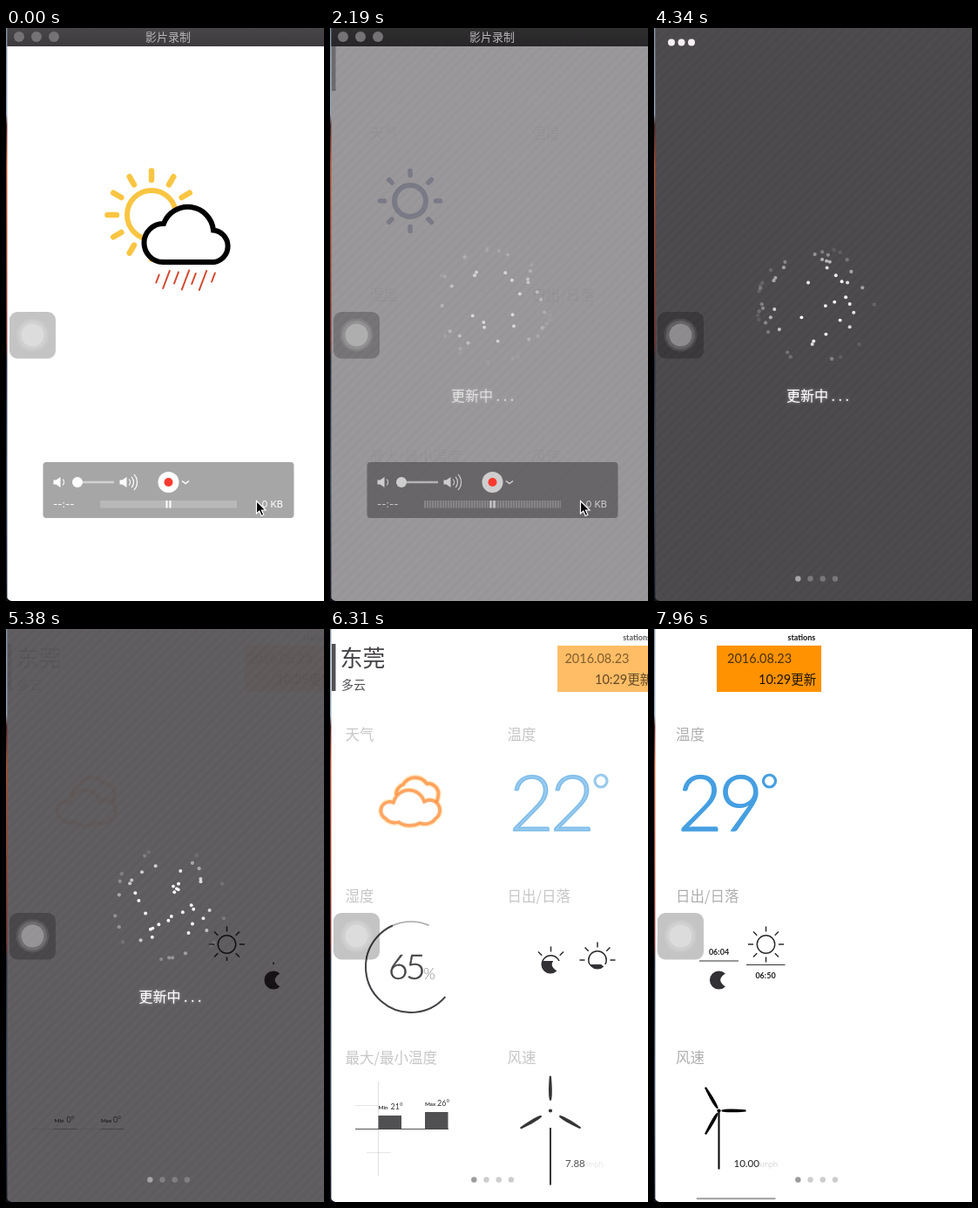
Recreate the animation shown at these times as an HTML page with a canvas. Size 365 by 656 pixels, loop 8000 ms.

```html
<!DOCTYPE html>
<html lang="zh">
<head>
<meta charset="utf-8">
<title>天气</title>
<style>
html, body { margin: 0; width: 100%; height: 100%; overflow: hidden; background: #fff; }
canvas { display: block; width: 365px; height: 656px; }
</style>
</head>
<body>
<canvas id="stage"></canvas>
<script>
const W = 365, H = 656, LOOP = 8000, TAU = Math.PI * 2, RAD = Math.PI / 180;
const CJK = '"Noto Sans CJK SC", "Noto Sans CJK", sans-serif';
const LATO = 'Lato, "Noto Sans CJK SC", "Noto Sans CJK", sans-serif';
const canvas = document.getElementById('stage');
const c = canvas.getContext('2d');
const dpr = window.devicePixelRatio || 1;
canvas.width = W * dpr;
canvas.height = H * dpr;

const clamp = v => Math.max(0, Math.min(1, v));
const ramp = (t, a, b) => clamp((t - a) / (b - a));
const smooth = u => u * u * (3 - 2 * u);
const black = a => `rgba(0,0,0,${a})`;
const white = a => `rgba(255,255,255,${a})`;

function layer(alpha, draw) {
  if (alpha <= 0) return;
  c.save();
  c.globalAlpha *= Math.min(1, alpha);
  draw();
  c.restore();
}
function rect(x, y, w, h, fill) {
  c.fillStyle = fill;
  c.fillRect(x, y, w, h);
}
function panel(x, y, w, h, r, fill) {
  c.beginPath();
  c.roundRect(x, y, w, h, r);
  c.fillStyle = fill;
  c.fill();
}
function disc(x, y, r, fill) {
  c.beginPath();
  c.arc(x, y, r, 0, TAU);
  c.fillStyle = fill;
  c.fill();
}
function arc(x, y, r, a, b, color, width) {
  c.beginPath();
  c.arc(x, y, r, a, b);
  c.strokeStyle = color;
  c.lineWidth = width;
  c.stroke();
}
function line(x1, y1, x2, y2, color, width) {
  c.beginPath();
  c.moveTo(x1, y1);
  c.lineTo(x2, y2);
  c.strokeStyle = color;
  c.lineWidth = width;
  c.stroke();
}
function text(s, x, y, font, color, align = 'left', spacing = 0) {
  c.font = font;
  c.textAlign = align;
  c.textBaseline = 'alphabetic';
  c.letterSpacing = spacing + 'px';
  c.fillStyle = color;
  c.fillText(s, x, y);
}
// Light figures with a slightly thicker stem
function figures(s, x, y, size, color, spacing, extra) {
  text(s, x, y, `300 ${size}px ${LATO}`, color, 'left', spacing);
  c.lineJoin = 'round';
  c.lineWidth = extra;
  c.strokeStyle = color;
  c.strokeText(s, x, y);
}
function rays(x, y, from, to, count, color, width) {
  for (let i = 0; i < count; i++) {
    const a = i * TAU / count, cx = Math.cos(a), sy = Math.sin(a);
    line(x + cx * from, y + sy * from, x + cx * to, y + sy * to, color, width);
  }
}

// Random points on a unit sphere
let seed = 20;
const rand = () => (seed = (seed * 16807) % 2147483647) / 2147483647;
for (let i = 0; i < 9; i++) rand();
const sphere = Array.from({ length: 96 }, () => {
  const y = rand() * 2 - 1;
  return { y, r: Math.sqrt(1 - y * y), a: rand() * TAU };
});

const bigCloud = new Path2D('M180 268A22 22 0 0 1 181 224A29.5 29.5 0 0 1 238 231.5A18.4 18.4 0 0 1 239 268Z');
const backCloud = new Path2D('M76 190A12 12 0 0 1 84 178A16 16 0 0 1 111 177A12 12 0 0 1 124 192A10 10 0 0 1 121 199');
const frontCloud = new Path2D('M64 217A10 10 0 0 1 73 199A18 18 0 0 1 108 198A11 11 0 0 1 121 217A14 12 0 0 1 103 222A16 10 0 0 1 79 221A12 9 0 0 1 64 217Z');
const moonShape = new Path2D('M7.4 -7.4A10.5 10.5 0 1 0 7.4 7.4Q-4 0 7.4 -7.4Z');

function splash() {
  c.lineCap = 'round';
  rays(167, 214, 40, 50.5, 12, '#f9c542', 6.5);
  arc(167, 214, 28, 0, TAU, '#f9c542', 6);
  c.fillStyle = '#fff';
  c.fill(bigCloud);
  c.lineWidth = 6;
  c.strokeStyle = '#000';
  c.stroke(bigCloud);
  const drops = [[174, 287, 4.5], [184, 288, 10], [195.5, 286, 6.5], [206, 288.5, 11], [215.5, 287, 6], [226, 289, 11], [238, 285.5, 5]];
  for (const [x, y, h] of drops) line(x + h * .38, y - h, x - h * .38, y + h, '#d2472c', 2);
}

const labels = [['天气', 17.5, 127], ['温度', 203.5, 127], ['湿度', 17.5, 312], ['日出/日落', 203.5, 312],
  ['最大/最小温度', 17.5, 497], ['风速', 203.5, 497]];
function drawLabels(dx) {
  for (const [s, x, y] of labels) text(s, x + dx, y, '300 16.5px ' + CJK, '#aeaeae');
}

function oldPage(t) {
  const out = 1 - ramp(t, 2350, 2900);
  layer(.3 * out, () => rect(2, 17, 4.5, 55, '#000'));
  layer((.8 + .2 * ramp(t, 1760, 2000)) * out, () => {
    c.lineCap = 'round';
    const color = '#c8cdde';
    arc(92, 198, 18, 0, TAU, color, 6);
    rays(92, 198, 29.5, 34.5, 8, color, 5.5);
  });
  layer(.13 * ramp(t, 1760, 2190) * (1 - ramp(t, 2200, 2700)), () => drawLabels(28));
}

function sunIcon(x, y) {
  arc(x, y, 10.2, 0, TAU, '#2c2c2e', 1.5);
  rays(x, y, 14.5, 20.5, 8, '#2c2c2e', 1.5);
}
function moonIcon(x, y) {
  c.save();
  c.translate(x, y);
  c.fillStyle = '#333135';
  c.fill(moonShape);
  c.restore();
}
function clipped(y, h, draw) {
  c.save();
  c.beginPath();
  c.rect(220, y, 120, h);
  c.clip();
  draw();
  c.restore();
}

function sunTimes(t, u) {
  const shift = 41 * smooth(u);
  const down = 361 + shift, up = 402 - shift;
  clipped(330, 50, () => sunIcon(253.5, down));
  clipped(380, 50, () => moonIcon(253, down));
  clipped(330, 54, () => sunIcon(307, up));
  clipped(384, 50, () => moonIcon(307, up));
  layer(ramp(t, 6850, 7350), () => {
    line(230.5, 380, 275.5, 380, '#333', 1.2);
    line(284.5, 384.5, 329, 384.5, '#333', 1.2);
    text('06:04', 253, 373, '700 9px ' + LATO, '#222', 'center');
    text('06:50', 306.5, 400, '700 9px ' + LATO, '#222', 'center');
  });
}

function bars(p, a) {
  layer(a * .5 * (1 - ramp(p, .85, 1)), () => {
    line(55.5, 518, 55.5, 626, '#999', 1);
    line(29, 545.5, 55, 545.5, '#aaa', 1);
    line(42, 599.5, 70, 599.5, '#aaa', 1);
  });
  layer(a * 1.4, () => line(29, 572.5, 136, 572.5, '#333', 1));
  layer(.75 + .25 * a, () => {
    for (const [name, x, full] of [['Min', 55.5, 26], ['Max', 109, 33]]) {
      const v = full * p, y = 572 - .73 * v;
      rect(x, y, 26.5, 572.4 - y, '#3e3e40');
      text(name, x, y - 7, '700 6.3px ' + LATO, '#222');
      text(Math.round(v) + '°', x + 14, y - 7, '400 9px ' + LATO, '#222');
    }
  });
}

function turbine(t, p, a) {
  const gap = 1 - p, k = Math.max(0, (t - 6400) / 1560);
  const turn = -90 + 210 * Math.pow(k, 1.5);
  layer(a * 1.3, () => {
    line(253, 553 + 85 * gap, 253, 618.5 + 85 * gap, '#000', 2);
    disc(253, 551.5, 2.1, '#000');
    for (let i = 0; i < 3; i++) {
      c.save();
      c.translate(253, 551.5);
      c.rotate((turn + 120 * i) * RAD);
      c.translate(42 * gap, 0);
      c.beginPath();
      c.moveTo(3, -.8);
      c.quadraticCurveTo(9, -3, 31, -1.2);
      c.lineTo(31, .9);
      c.quadraticCurveTo(9, 2.8, 3, .8);
      c.fillStyle = '#000';
      c.fill();
      c.restore();
    }
    const speed = (Math.floor(1000 * p) / 100).toFixed(2);
    text(speed, 270, 616, '400 11.5px ' + LATO, '#222');
  });
  layer(a, () => text('kmph', p > .95 ? 299 : 292, 615.5, '300 9px ' + LATO, '#bbb'));
}

function newPage(t) {
  const a = ramp(t, 5290, 6990);
  const late = ramp(t, 5390, 6900);
  const u = ramp(t, 5400, 7086);
  const p = 1 - (1 - u) * (1 - u);
  const city = ramp(t, 5290, 6350);

  layer(city, () => {
    rect(2, 17, 4.5, 54, '#4c4a4e');
    text('东莞', 11.5, 43, '300 26px ' + CJK, '#3c3a3e');
    text('多云', 13, 68.5, '300 14px ' + CJK, '#4c4a4e');
  });
  layer(a, () => rect(250.5 + 23 * (1 - u), 19, 120, 53, '#ff9200'));
  layer(.25 * city + .75 * a, () => {
    text('stations', 332 + 9 * (1 - u), 12.5, '700 9px ' + LATO, '#111');
    text('2016.08.23', 262.5 + 15 * (1 - u), 39, '400 14.5px ' + LATO, '#4a3212');
    text('10:29更新', 298.5 + 12 * (1 - u), 62.5, '400 14.5px ' + LATO, '#1c1408');
  });
  layer(late * 1.15, () => drawLabels(0));

  layer(a * 1.2, () => {
    c.lineJoin = 'round';
    for (const [color, w] of [['#ffe0a8', 6.5], ['#ff8a3a', 3.8]]) {
      c.strokeStyle = color;
      c.lineWidth = w;
      c.stroke(backCloud);
      c.fillStyle = '#fff';
      c.fill(frontCloud);
      c.stroke(frontCloud);
    }
  });

  layer(late, () => {
    // Blend towards white so fill and outline stay one tone
    const k = .8 + .2 * u, mix = v => Math.round(255 - (255 - v) * k);
    const blue = `rgb(${mix(70)},${mix(159)},${mix(225)})`;
    figures(Math.floor(29 * p), 205.5, 231, 89, blue, -4.6, 1.5);
    arc(311, 174, 7, 0, TAU, blue, 3.2);
  });

  layer(ramp(t, 5390, 6300), () => {
    const start = 41 * RAD;
    arc(93, 387, 52, start, start + 320 * RAD * p, '#a9a7aa', 1.5);
    arc(93, 387, 52, start, start + 260 * RAD * p, '#454347', 2);
    figures(Math.floor(83 * p), 67, 401, 39, '#454347', -2.5, .5);
    text('%', 107, 401, '300 18px ' + LATO, '#8c8a8e');
  });

  sunTimes(t, u);
  bars(p, a);
  turbine(t, p, late);
}

function overlay(q) {
  rect(0, 0, W, H, `rgba(5,0,5,${.705 * q})`);
  for (let x = -H; x < W; x += 11) line(x, H, x + H, 0, black(.035 * q), 3);
}

function loader(t, q) {
  layer(q * 1.1, () => {
    const spin = t * .0015;
    for (const d of sphere) {
      const z = d.r * Math.cos(d.a + spin);
      if (z < 0) continue;
      const x = 186 + 68 * d.r * Math.sin(d.a + spin);
      disc(x, 317 + 66 * d.y, 1.9 + .4 * (1 - z), white(Math.min(1, .1 + 1.3 * z * z)));
    }
    c.shadowColor = white(.6);
    c.shadowBlur = 3 * dpr;
    text('更新中 . . .', 152.5 - 13.5 * Math.exp((2190 - t) / 670), 426.5, '300 16px ' + CJK, '#fff');
  });
}

function pageDots(t, q) {
  if (t < 1760) return;
  const light = t < 3000 ? ramp(t, 2190, 2500) : q;
  const dark = t < 3000 ? .36 * (1 - ramp(t, 1760, 2080)) : 1 - q;
  for (let i = 0; i < 4; i++) {
    const x = 165.3 + 14.2 * i, on = i ? .5 : 1;
    disc(x, 630.5, 3.2, black(.39 * on * dark));
    disc(x, 630.5, 3.2, white(.5 * on * light));
  }
}

function speaker(x, y, waves, color) {
  c.beginPath();
  c.moveTo(x, y - 2.5);
  c.lineTo(x + 3, y - 2.5);
  c.lineTo(x + 8, y - 6);
  c.lineTo(x + 8, y + 6);
  c.lineTo(x + 3, y + 2.5);
  c.lineTo(x, y + 2.5);
  c.fillStyle = color;
  c.fill();
  for (let i = 0; i < waves; i++) arc(x + 7, y, 5 + 4 * i, -.75, .75, color, 1.2);
}

function recorder(q) {
  const bar = c.createLinearGradient(0, 0, 0, 21);
  bar.addColorStop(0, '#484648');
  bar.addColorStop(1, '#3c3a3c');
  rect(1, 0, W, 21, bar);
  rect(1, 0, W, 21, black(.6 * q));
  for (const x of [15, 35, 55]) disc(x, 10, 6, '#747274');
  text('影片录制', 186, 15, '400 13px ' + CJK, '#b8b6b8', 'center');

  const v = Math.round(255 - 85 * q), ink = `rgb(${v},${v},${v})`;
  panel(42.5, 497, 288, 64, 4, 'rgba(24,22,24,.38)');
  speaker(54.5, 520, 1, ink);
  line(80, 520, 124, 520, white(.5), 2.5);
  disc(82, 520, 6, ink);
  speaker(130.5, 520, 3, ink);
  disc(186.5, 520, 12, ink);
  disc(186.5, 520, 5, '#fb3a2f');
  c.beginPath();
  c.moveTo(202, 518.5);
  c.lineTo(206, 521.5);
  c.lineTo(210, 518.5);
  c.strokeStyle = ink;
  c.lineWidth = 1.5;
  c.stroke();
  text('--:--', 54, 549, '400 11.5px Inter, sans-serif', ink);
  rect(108, 541, 157, 8.5, white(.2));
  if (q > .1) for (let x = 110; x < 265; x += 3) rect(x, 541, 1, 8.5, black(.3 * q));
  rect(183.5, 541, 2, 8.5, ink);
  rect(187.5, 541, 2, 8.5, ink);
  text('0 KB', 318, 549, '400 11px Inter, sans-serif', ink, 'right');

  c.fillStyle = '#000';
  c.strokeStyle = '#fff';
  c.lineWidth = 1.2;
  const arrow = new Path2D('M287.5 541.5V556L290.8 553L293.2 558.5L295.8 557.3L293.4 552H298Z');
  c.fill(arrow);
  c.stroke(arrow);
}

function touchButton() {
  panel(4, 325, 53, 53.5, 9, 'rgba(2,0,4,.23)');
  disc(30.5, 351.5, 19, white(.09));
  disc(30.5, 351.5, 16.5, white(.12));
  disc(30.5, 351.5, 13, white(.27));
}

function desktopEdge() {
  const g = c.createLinearGradient(0, 0, 0, H);
  const stops = [[0, '#7f93a6'], [.15, '#8fa5b8'], [.17, '#4a1d1c'], [.24, '#b04a28'], [.42, '#8c3a26'],
    [.55, '#6a2824'], [.58, '#1f2a3a'], [.8, '#33475c'], [1, '#10161f']];
  for (const [p, color] of stops) g.addColorStop(p, color);
  rect(0, 0, 1.4, H, g);
  c.beginPath();
  c.moveTo(0, H);
  c.lineTo(0, H - 6);
  c.quadraticCurveTo(1.5, H - 1.5, 6, H);
  c.fillStyle = '#10161f';
  c.fill();
}

function draw(t) {
  c.setTransform(dpr, 0, 0, dpr, 0, 0);
  c.lineCap = 'butt';
  rect(0, 0, W, H, '#fff');

  const q = t < 4000 ? ramp(t, 1760, 2510) : 1 - ramp(t, 5310, 6000);
  const scroll = 178.5 * ramp(t, 7700, 7955);

  if (t >= 1760 && t < 2900) oldPage(t);
  layer(t < 1760 ? 1 : .67 * (1 - ramp(t, 1760, 2000)), splash);
  if (t >= 5250) {
    c.save();
    c.translate(-scroll, 0);
    newPage(t);
    c.restore();
  }
  if (q > 0) {
    overlay(q);
    loader(t, q);
  }
  layer(ramp(t, 2600, 2700) * (1 - ramp(t, 5200, 5370)), () => {
    for (const x of [20, 31.5, 43]) disc(x, 16.5, 4, '#f6eef2');
  });
  pageDots(t, q);
  if (scroll > 0) panel(4 + scroll / 4, 651, 91, 2.2, 1, '#a8a6a8');
  layer(1 - ramp(t, 2700, 3150), () => recorder(q));
  touchButton();
  desktopEdge();
}

function tick() {
  draw(performance.now() % LOOP);
  requestAnimationFrame(tick);
}
tick();
</script>
</body>
</html>
```
